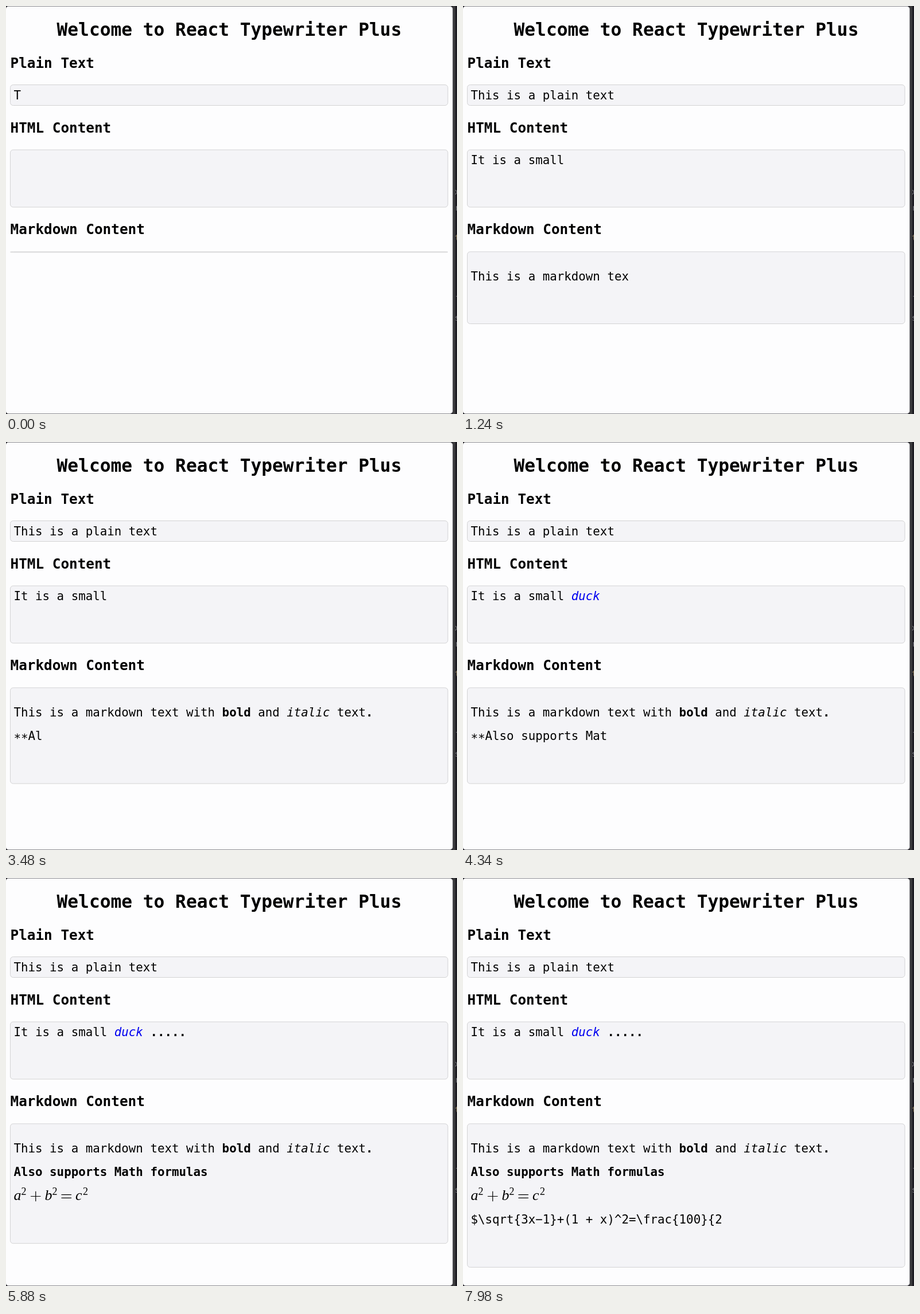
An HTML page for the animation above (8000 ms loop, 786 by 712 pixels).

```html
<!DOCTYPE html>
<html lang="en">
<head>
<meta charset="utf-8">
<title>Typewriter</title>
<style>
  html, body { margin: 0; width: 100%; height: 100%; overflow: hidden; background: #1d1c22; }
  svg { display: block; width: 100%; height: 100%; }
  text { font: 20.8px "DejaVu Sans Mono", monospace; white-space: pre; fill: #000; }
  .h1 { font-size: 31.2px; font-weight: bold; text-anchor: middle; }
  .h2 { font-size: 24.336px; font-weight: bold; }
  .b { font-weight: bold; }
  .i { font-style: italic; }
  .duck { font-style: italic; fill: #0000f0; }
  .box { fill: #f4f4f7; stroke: #d3d3d4; }
  .edge text { font-size: 14px; fill: #77777d; }
  .math text { font: italic 26px "Liberation Serif", serif; }
  .math .sup { font: 18px "Liberation Serif", serif; }
  .math path { stroke: #000; stroke-width: 1.2; fill: none; }
</style>
</head>
<body>
<svg viewBox="0 0 786 712">
  <rect width="786" height="712" fill="#1d1c22"/>
  <rect x="778" width="5" height="712" fill="#39393b"/>
  <g class="edge">
    <text x="782" y="329">x</text>
    <text x="782" y="357">r</text>
    <text x="782" y="409" style="fill:#8a7a5c">t</text>
    <text x="782" y="511">-</text>
    <text x="782" y="549">s</text>
  </g>
  <rect x="-.5" y=".5" width="779" height="711" rx="5" fill="#fdfdfe" stroke="#8e8e92"/>

  <text class="h1" x="389" y="52">Welcome to React Typewriter Plus</text>
  <text class="h2" x="7.5" y="107.5">Plain Text</text>
  <text class="h2" x="7.5" y="220.5">HTML Content</text>
  <text class="h2" x="7.5" y="398">Markdown Content</text>

  <rect class="box" x="7.5" y="137.5" width="762.5" height="36" rx="5"/>
  <rect class="box" x="7.5" y="251" width="762.5" height="100" rx="5"/>
  <rect class="box" id="mdBox" x="7.5" y="428.9" width="762.5" rx="5"/>

  <text id="plain" x="13.5" y="163"></text>
  <text id="html" x="13.5" y="276"></text>
  <g id="md"></g>
</svg>
<script>
const LOOP = 8000, START = -10, CHAR = 56.7;
const BEAT = 840, HOLD = 740;
const LINE = 41.6, FIRST = 478.5;

const plainSrc = 'This is a plain text';
const htmlSrc = '<p>It is a small <span style="color: blue; font-style: italic;">duck</span> <b>.....</b></p>';
const mdSrc = 'This is a markdown text with **bold** and _italic_ text.\n' +
  '**Also supports Math formulas**\n\n' +
  '$a^2+b^2=c^2$\n\n' +
  '$\\sqrt{3x-1}+(1 + x)^2=\\frac{100}{2}$';

const el = id => document.getElementById(id);
const span = (cls, s) => `<tspan class="${cls}">${s}</tspan>`;

function renderHtml(src) {
  return src
    .replace(/<[^>]*$/, '')
    .replace(/<span[^>]*>([^<]*)(<\/span>)?/, (_, s) => span('duck', s))
    .replace(/<b>([^<]*)(<\/b>)?/, (_, s) => span('b', s))
    .replace(/<\/?p>/g, '');
}

function inline(src) {
  return src
    .replace(/\*\*([^*]+)\*\*/, (_, s) => span('b', s))
    .replace(/\*\*([^*]+)\*$/, (_, s) => '*' + span('i', s))
    .replace(/_(\w+)_/, (_, s) => span('i', s))
    .replace(/\*/g, '\u2217')
    .replace(/-/g, '\u2212')
    .replace(/\./g, span('b', '.'));
}

function formula(y) {
  const power = (v, x) =>
    `<text x="${x}" y="0">${v}</text><text class="sup" x="${x + 13}" y="-9">2</text>`;
  return `<g class="math" transform="translate(0 ${y})">` +
    power('a', 13.5) + power('b', 67.5) + power('c', 121) +
    '<path d="M43 -6.2h17.5M51.75 -15v17.5M96.5 -9.1h17.5M96.5 -3.3h17.5"/></g>';
}

function renderMd(lines) {
  return lines.map((line, i) => {
    const y = FIRST + i * LINE;
    return /^\$[^$]+\$$/.test(line)
      ? formula(y)
      : `<text x="13.5" y="${y}">${inline(line)}</text>`;
  }).join('');
}

// The picture rests for the last part of every beat.
function rest(t) {
  const phase = (t + 20) % BEAT;
  return phase > HOLD ? t - phase + HOLD : t;
}

let shown = -1;
function draw(t) {
  const n = Math.floor((rest(t) - START) / CHAR);
  if (n === shown) return;
  shown = n;
  const lines = mdSrc.slice(0, n).split('\n').filter(Boolean);
  el('plain').textContent = plainSrc.slice(0, n + 1);
  el('html').innerHTML = renderHtml(htmlSrc.slice(0, n));
  el('md').innerHTML = renderMd(lines);
  el('mdBox').setAttribute('height', lines.length ? 84 + lines.length * LINE : 1);
}

const begin = performance.now();
function tick() {
  draw((performance.now() - begin) % LOOP);
  requestAnimationFrame(tick);
}
tick();
</script>
</body>
</html>
```
